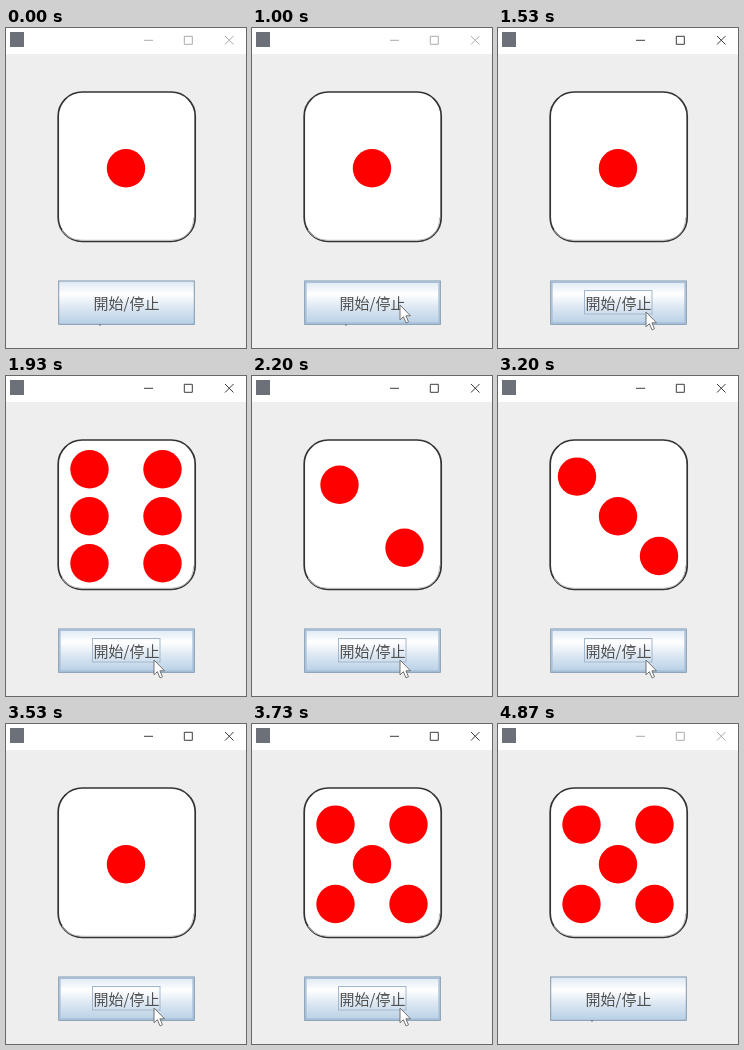
Recreate the animation shown at these times as an HTML page. Size 240x320 px, loop 4940 ms.

```html
<!DOCTYPE html>
<html lang="zh-Hant">
<head>
<meta charset="utf-8">
<title>開始/停止</title>
<style>
  html, body { margin: 0; width: 100%; height: 100%; overflow: hidden; background: #eee; }
  svg { display: block; width: 100%; height: 100%; }
  text { font: 15px "Noto Sans CJK TC", "Noto Sans CJK", sans-serif; fill: #505050; }
</style>
</head>
<body>
<svg viewBox="0 0 240 320">
  <defs>
    <linearGradient id="metal" x2="0" y2="1">
      <stop stop-color="#dde8f3"/>
      <stop offset=".3" stop-color="#fff"/>
      <stop offset=".6" stop-color="#dde8f3"/>
      <stop offset="1" stop-color="#b8cfe5"/>
    </linearGradient>
  </defs>

  <rect width="240" height="320" fill="#eee"/>
  <rect width="240" height="26" fill="#fff"/>
  <rect x="4" y="4" width="14" height="15" fill="#6c7078"/>
  <path id="controls" d="M138 12.300h9M178.300 8.300h8v8h-8zM219 8l8.500 8.500M227.500 8l-8.500 8.500" fill="none"/>

  <rect x="52.200" y="64" width="137" height="149.500" rx="24" fill="#fff" stroke="#333" stroke-width="1.700"/>
  <path d="M56 202q6 10 20 10.300h89q22-1 22.700-23" fill="none" stroke="#bbb"/>
  <g id="pips" fill="#f00"></g>

  <rect id="button" x="52.700" y="253" width="135.600" height="43.300" stroke="#7f97ae"/>
  <rect id="hover" x="53.900" y="254.200" width="133.200" height="40.900" fill="none" stroke="#a3bdd8" stroke-width="1.400"/>
  <rect id="focus" x="86.500" y="262.500" width="67.500" height="23.500" fill="none" stroke="#a3b8cc"/>
  <text x="120.500" y="281" text-anchor="middle">開始/停止</text>
  <path id="speck" d="M93 297h2" stroke="#667" stroke-width="1.200"/>
  <path id="cursor" d="M0 0v14.800l3.400-3.100 2.600 6.200 2.500-1.100-2.600-6h4.600z" fill="#fff" stroke="#666" stroke-width=".9"/>
</svg>
<script>
const LOOP = 4940;
const TICK = 1000 / 15;

// Moments of the story, in ticks
const enter = 8, arrive = 12, leave = 62, blur = 72;
const clicks = [16, 32, 43, 55];
const [start1, stop1, start2, stop2] = clicks;
const SPIN_DELAY = 3;

const $ = id => document.getElementById(id);
const show = (id, on) => $(id).setAttribute('visibility', on ? 'visible' : 'hidden');
const within = (n, from, to) => n >= from && n < to;
const mix = (a, b, p) => a + (b - a) * p;

const randomFace = n => 1 + 15 * n * n % 31 % 6;

function faceAt(n) {
  if (n < start1 + SPIN_DELAY) return 1;
  if (n <= stop1) return randomFace(n);
  if (n < start2 + SPIN_DELAY) return 2;
  return n <= stop2 ? randomFace(n) : 5;
}

// Pips lie in pairs mirrored through the centre of the die
function pips(face) {
  const dx = face === 2 ? 32.5 : face === 3 ? 41 : 36.5;
  const dy = face === 2 ? 31.5 : face === 6 ? 47 : 39.7;
  const points = face % 2 ? [[0, 0]] : [];
  const addPair = (x, y) => points.push([x, y], [-x, -y]);
  if (face > 1) addPair(dx, dy);
  if (face > 3) addPair(dx, -dy);
  if (face === 6) addPair(dx, 0);
  return points;
}

function pointerAt(n) {
  const p = Math.min(1, (n - enter) / (arrive - enter));
  const eased = 1 - (1 - p) ** 1.5;
  const y = n < start1 ? mix(287, 277, eased) : n < leave ? 284 : 290;
  return [mix(228, 148, eased), y];
}

function draw() {
  const n = Math.floor((performance.now() % LOOP + 5) / TICK);
  const pressed = clicks.includes(n);
  const active = within(n, start1, blur);
  const hasPointer = within(n, enter, leave + 1);

  $('pips').innerHTML = pips(faceAt(n))
    .map(([x, y]) => `<circle cx="${120 + x}" cy="${140.3 + y}" r="19.200"/>`).join('');
  $('controls').setAttribute('stroke', active ? '#3c3c3c' : '#aaa');
  $('button').setAttribute('fill', pressed ? '#b8cfe5' : 'url(#metal)');
  show('hover', !pressed && within(n, enter + 2, leave + 1));
  show('focus', active);
  show('speck', !within(n, start1, leave + 1));
  show('cursor', hasPointer);
  if (hasPointer) $('cursor').setAttribute('transform', `translate(${pointerAt(n)})`);
  requestAnimationFrame(draw);
}
draw();
</script>
</body>
</html>
```
